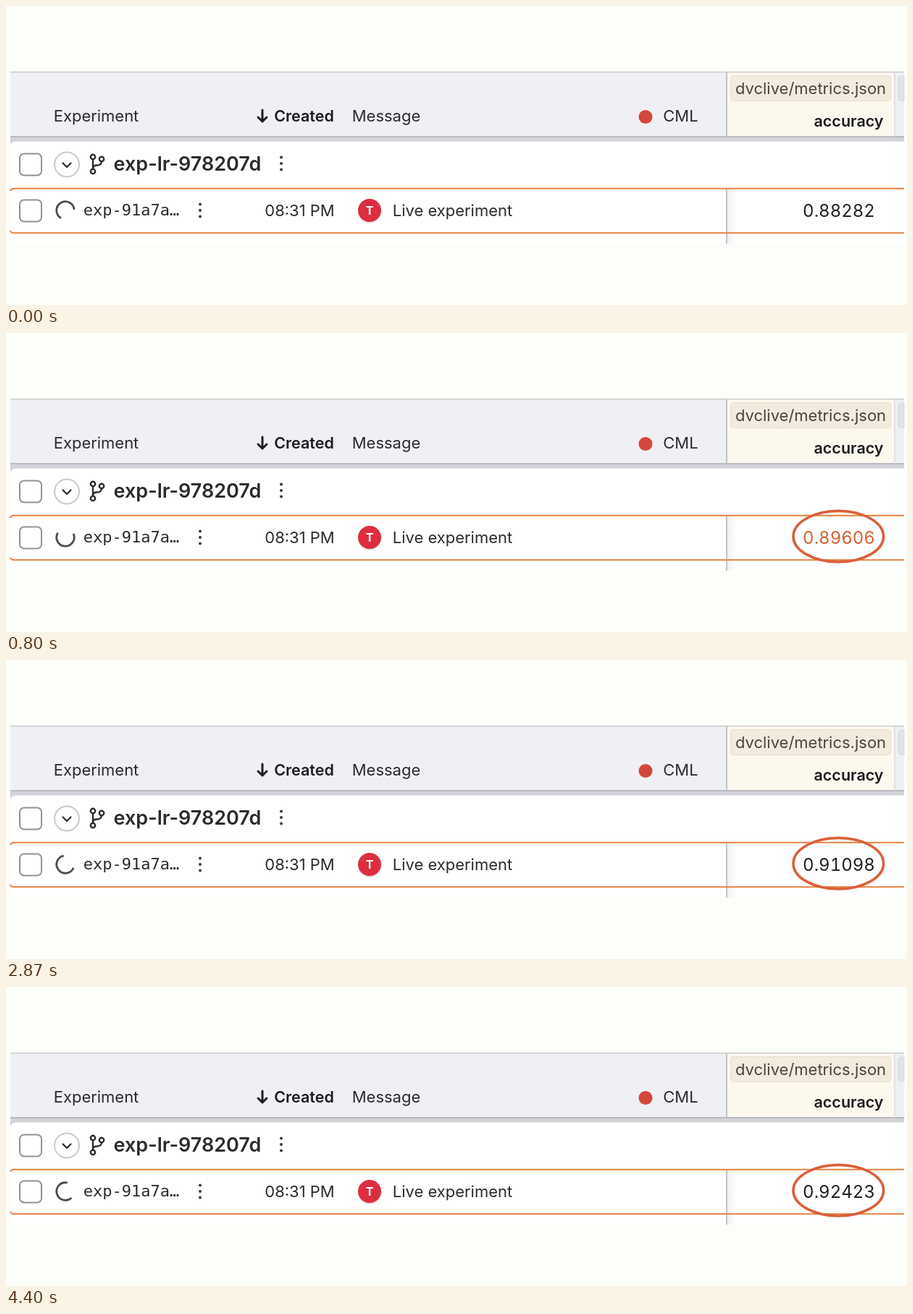
Write an HTML page that moves like this. It is 1244 px wide and 414 px high and loops after 4470 ms.

```html
<!DOCTYPE html>
<html lang="en">
<head>
<meta charset="utf-8">
<title>Live experiment table</title>
<style>
  html, body { margin: 0; width: 100%; height: 100%; overflow: hidden; background: #fcfefa; }
  svg { display: block; width: 100vw; height: 100vh; }
  text { font: 22px Inter, sans-serif; fill: #2b2b2e; text-anchor: middle; }
  .strong { font-weight: 600; font-size: 21.5px; fill: #1d1d1f; }
  .name { font-weight: 600; font-size: 27px; }
  .mono { font-family: "DejaVu Sans Mono", monospace; }
  .value { font-size: 24px; font-feature-settings: "tnum"; }
  .avatar { font-size: 16px; font-weight: 700; fill: #fff; }
  .line { fill: none; stroke-linecap: round; stroke-linejoin: round; }
</style>
</head>
<body>
<svg viewBox="0 0 1244 414">
  <defs>
    <linearGradient id="shade">
      <stop offset="0" stop-color="#000" stop-opacity=".06"/>
      <stop offset="1" stop-color="#000" stop-opacity="0"/>
    </linearGradient>
    <clipPath id="wipe"><rect id="reveal" x="1080" y="236" width="0" height="92"/></clipPath>
    <rect id="box" x="19" y="-15" width="30" height="30" rx="6" fill="#fff" stroke="#929294" stroke-width="2"/>
    <g id="dots" fill="#38383a">
      <circle cy="-8.5" r="2"/><circle r="2"/><circle cy="8.5" r="2"/>
    </g>
  </defs>
  <rect id="back" width="1244" height="414" fill="#fcfefa"/>

  <g id="table">
    <!-- header -->
    <rect x="6" y="91" width="1234" height="238" fill="#fff"/>
    <rect x="6" y="91" width="1234" height="90" fill="#eff0f4"/>
    <rect x="996" y="92" width="230" height="89" fill="#fdf8ee"/>
    <path d="M6 181H1240V187.5H14Q6 187.5 6 195Z" fill="#d3d3d9"/>
    <path d="M6 91.5H1240" stroke="#c9c9cd" stroke-width="1.5"/>
    <path d="M6 181H1240" stroke="#b9b9be" stroke-width="2"/>
    <path d="M995 92V181M995 252V329" stroke="#c3c3c6" stroke-width="2"/>
    <path d="M1227 92V181" stroke="#dddde0" stroke-width="1.5"/>
    <rect x="996" y="254" width="12" height="75" fill="url(#shade)"/>
    <rect x="1000.5" y="96.5" width="221" height="35" rx="4" fill="#f3ebde" stroke="#ddd3c4" stroke-dasharray="2 1"/>
    <path d="M1240 97H1236Q1232 97 1232 101V127Q1232 131 1236 131H1240Z" fill="#e3e3e7" stroke="#d6d6da"/>
    <text x="124.5" y="160">Experiment</text>
    <path class="line" d="M354 144V160M348 154L354 160L360 154" stroke="#1d1d1f" stroke-width="3"/>
    <text class="strong" x="411.5" y="160">Created</text>
    <text x="525" y="160">Message</text>
    <circle cx="883" cy="153.5" r="9.5" fill="#d4473c"/>
    <text x="931.5" y="160">CML</text>
    <text x="1111" y="122" style="fill:#48443f">dvclive/metrics.json</text>
    <text class="strong" x="1163.5" y="167">accuracy</text>

    <!-- branch row -->
    <use href="#box" y="219.5"/>
    <circle cx="84" cy="219.5" r="17" fill="#fff" stroke="#cbcbcd" stroke-width="2"/>
    <path class="line" d="M78.5 217.5L84 223L89.5 217.5" stroke="#2b2b2e" stroke-width="2.2"/>
    <g class="line" stroke="#2b2b2e" stroke-width="2.4">
      <circle cx="120" cy="209" r="3.2"/><circle cx="120" cy="229" r="3.2"/><circle cx="132" cy="212" r="3.2"/>
      <path d="M120 212.5V225.5M132 215.5Q131.5 220.5 126 220.5Q120 220.5 120 225"/>
    </g>
    <text class="name" x="250.5" y="227.5">exp-lr-978207d</text>
    <use href="#dots" x="380" y="218"/>

    <!-- experiment row -->
    <path d="M6 256Q7 252.7 11 252.7H1240M6 311Q7 314.3 11 314.3H1240" fill="none" stroke="#e8813f" stroke-width="2"/>
    <use href="#box" y="283.5"/>
    <path id="spinner" fill="none" stroke="#4c4c4f" stroke-width="2.8"/>
    <text class="mono" x="173" y="290">exp-91a7a…</text>
    <use href="#dots" x="268" y="283"/>
    <text x="405.5" y="291">08:31 PM</text>
    <circle cx="502" cy="284.5" r="16.5" fill="#000" opacity=".1"/>
    <circle cx="502" cy="283" r="16" fill="#dc2e3e"/>
    <text class="avatar" x="502" y="289">T</text>
    <text x="616.5" y="291">Live experiment</text>
    <text id="value" class="value" x="1150" y="291.5"></text>
  </g>

  <ellipse cx="1149.3" cy="281.7" rx="62.3" ry="35.3" fill="none" stroke="#d9603a" stroke-width="3.6" clip-path="url(#wipe)"/>
</svg>
<script>
const LOOP = 4470, FPS = 15;
const WIPE_START = 270, WIPE_TIME = 340, FADE = 450;
const updates = [[-1000, "0.88282"], [730, "0.89606"], [2000, "0.91098"], [3330, "0.92423"]];
const ORANGE = [224, 104, 48], INK = [32, 32, 34];
const el = id => document.getElementById(id);
const clamp = x => Math.min(1, Math.max(0, x));
const smooth = x => x * x * (3 - 2 * x);

// Open ring around (82, 283), turning twice a second
function ring(t) {
  const at = deg => {
    const a = deg * Math.PI / 180;
    return `${82 + 12.2 * Math.cos(a)} ${283 + 12.2 * Math.sin(a)}`;
  };
  const gap = 57 + t * 0.72;
  return `M${at(gap + 62)}A12.2 12.2 0 1 1 ${at(gap - 62)}`;
}

function draw(now) {
  const frame = Math.floor((now % LOOP) * FPS / 1000 + 0.06);
  const t = frame * 1000 / FPS;

  el("spinner").setAttribute("d", ring(t));

  const wipe = clamp((t - WIPE_START) / WIPE_TIME);
  const wiping = wipe > 0 && wipe < 1;
  el("reveal").setAttribute("width", wipe ? 5 + 131 * wipe : 0);
  el("table").setAttribute("transform", wiping ? "translate(-0.8 0.9)" : "");
  el("back").setAttribute("fill", wiping ? "#fff" : "#fcfefa");

  const [since, text] = updates.filter(([start]) => t >= start - 1).pop();
  const k = smooth(clamp((t - since) / FADE));
  const rgb = ORANGE.map((c, i) => Math.round(c + (INK[i] - c) * k));
  el("value").textContent = text;
  el("value").style.fill = `rgb(${rgb})`;
}

const start = performance.now();
function tick() {
  draw(performance.now() - start);
  requestAnimationFrame(tick);
}
tick();
</script>
</body>
</html>
```
